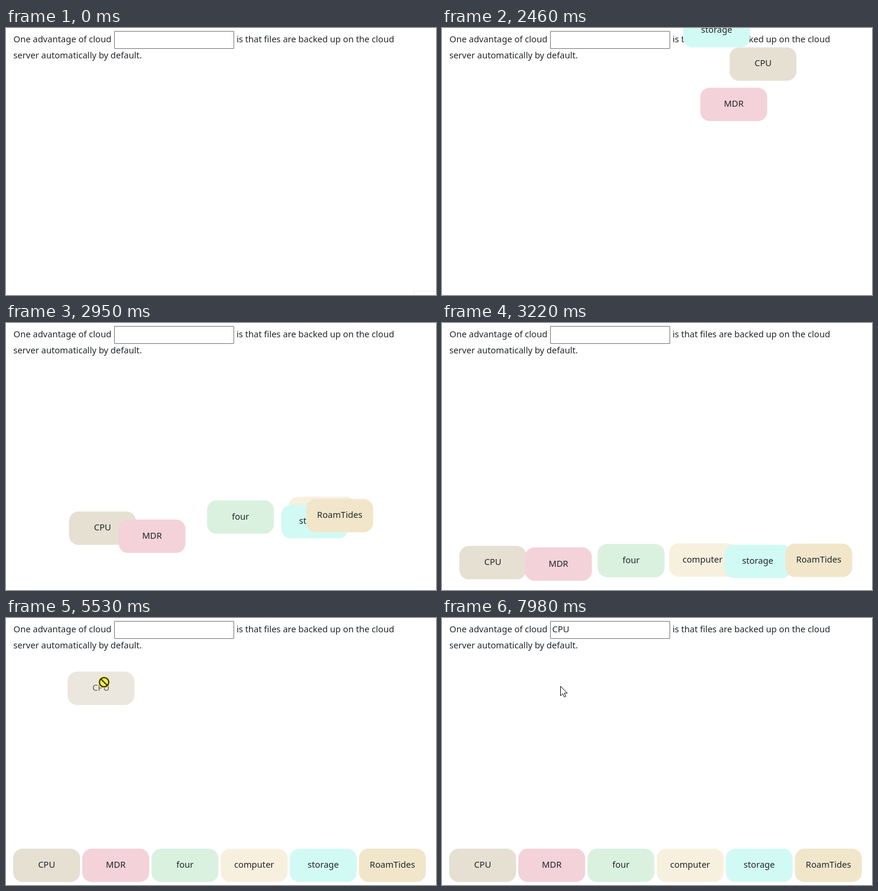
An HTML page for the animation above (8000 ms loop, 720 by 448 pixels).

```html
<!DOCTYPE html>
<html lang="en">
<head>
<meta charset="utf-8">
<title>Drag the missing word</title>
<style>
html, body { margin: 0; width: 100%; height: 100%; overflow: hidden; background: #fff; }
svg { display: block; width: 720px; height: 448px; }
text { font: 14.6px "Noto Sans", "Open Sans", sans-serif; fill: #212529; }
.label { text-anchor: middle; }
</style>
</head>
<body>
<svg id="stage" viewBox="0 0 720 448">
  <path id="corner" d="M682.5 448V441.5H720" fill="none" stroke="#f0f0f0"/>
  <text x="12.5" y="24">One advantage of cloud</text>
  <text x="386" y="24">is that files are backed up on the cloud</text>
  <text x="12.3" y="51">server automatically by default.</text>
  <rect id="field" x="181.5" y="5.5" width="200" height="29" rx=".5" fill="#fff"/>
  <text id="answer" x="184.5" y="24">CPU</text>
  <g id="tiles"></g>
  <g id="ghost" opacity=".75"></g>
  <circle id="press" r="10" fill="#f6ee3e" opacity=".85"/>
  <path id="arrow" d="M.5 .5V16.5L4.2 13 6.8 18.6 9.3 17.5 6.8 12H11.8Z" fill="#fff" stroke="#111"/>
  <g id="deny" fill="none" stroke="#2e2c0a" stroke-width="2">
    <circle r="7.8"/><path d="M-5.5 -5.5L5.5 5.5"/>
  </g>
  <path id="beam" d="M-3 -8H-1L0 -7 1 -8H3M0 -7V7M-3 8H-1L0 7 1 8H3" fill="none" stroke="#111"/>
</svg>
<script>
const LOOP = 8000, STEP = 70, GRAB = [56, 31];
const $ = id => document.getElementById(id);

// label, colour, starting x and y; every tile settles into the bottom row
const WORDS = [
  ["CPU", "#e6e0d3", 490, 26],
  ["MDR", "#f3d2d9", 438, 95],
  ["four", "#daf1e0", 719, -70],
  ["computer", "#f8f0de", 941, -101],
  ["storage", "#d2faf5", 402.5, -31],
  ["RoamTides", "#f1e6ca", 140, -82]
];
const tile = ([label, fill]) =>
  `<rect width="112" height="56" rx="16" fill="${fill}"/><text class="label" x="56" y="32">${label}</text>`;
$("tiles").innerHTML = WORDS.map(w => `<g>${tile(w)}</g>`).join("");
$("ghost").innerHTML = tile(WORDS[0]);
const tiles = [...$("tiles").children];

// time, x, y
const ENTER = [[70, 655, 388], [140, 552, 205]];
const APPROACH = [[4430, 12, 374], [4640, 46, 401], [4850, 68, 418]];
const DRAG = [[5050, 17, 381], [5190, 33, 330], [5260, 52, 245], [5400, 80, 180],
  [5530, 103, 90], [5810, 124, 37], [6440, 151, 0]];
const LEAVE = [[7630, 207, 31], [7770, 210, 62], [7980, 198, 114]];
const BEATS = [0, 1470, 2460, 3220, 4430, 5050, 5530, 6770, 7700];

function along(path, t) {
  if (t <= path[0][0]) return path[0].slice(1);
  const i = path.findIndex(p => p[0] > t);
  if (i < 0) return path[path.length - 1].slice(1);
  const [t0, x0, y0] = path[i - 1], [t1, x1, y1] = path[i];
  const k = (t - t0) / (t1 - t0);
  return [x0 + (x1 - x0) * k, y0 + (y1 - y0) * k];
}

// cubic-bezier(.25, .1, .25, 1)
function ease(x) {
  if (x <= 0) return 0;
  if (x >= 1) return 1;
  let lo = 0, hi = 1, s;
  for (let i = 0; i < 24; i++) {
    s = (lo + hi) / 2;
    if (.75 * s * (1 - s) + s ** 3 < x) lo = s; else hi = s;
  }
  return .3 * s * (1 - s) ** 2 + 3 * s * s * (1 - s) + s ** 3;
}

function hold(t) {
  const beat = BEATS.filter(b => b <= t).pop();
  return beat + Math.floor((t - beat) / STEP) * STEP;
}

const show = (el, on) => el.setAttribute("visibility", on ? "visible" : "hidden");
const place = (el, [x, y]) => el.setAttribute("transform", `translate(${x.toFixed(2)} ${y.toFixed(2)})`);

function pointer(t) {
  if (t < 4430) return along(ENTER, t);
  if (t < 5050) return along(APPROACH, t);
  if (t < 6770) {
    // the dragged copy trails the pointer by one step
    const [x, y] = along(DRAG, t + STEP);
    return [x + GRAB[0], y + GRAB[1]];
  }
  return along(LEAVE, t);
}

function draw(time) {
  const t = hold(time);
  const p = ease((t - 2427) / 1042);
  WORDS.forEach(([, , x, y], i) =>
    place(tiles[i], [x + (12 + 115.8 * i - x) * p, y + (387 - y) * p]));
  show($("tiles"), t >= 1470);
  show($("corner"), t < 70);

  const dragging = t >= 5050 && t < 6770;
  const at = pointer(t);
  const inField = at[0] > 181 && at[0] < 382 && at[1] < 35;
  const typing = t >= 6770 && inField;
  const visible = (t >= 70 && t < 210) || t >= 4430;
  const denied = dragging && !inField;

  place($("ghost"), along(DRAG, t));
  show($("ghost"), dragging);
  show($("answer"), t >= 6770);
  $("field").setAttribute("stroke", typing ? "#4f4f4f" : "#767676");

  for (const id of ["press", "arrow", "deny", "beam"]) place($(id), at);
  show($("press"), t >= 5050 && t < 6840);
  show($("deny"), denied);
  show($("beam"), typing);
  show($("arrow"), visible && !denied && !typing);
}

const start = performance.now();
function tick() {
  draw((performance.now() - start) % LOOP);
  requestAnimationFrame(tick);
}
tick();
</script>
</body>
</html>
```
